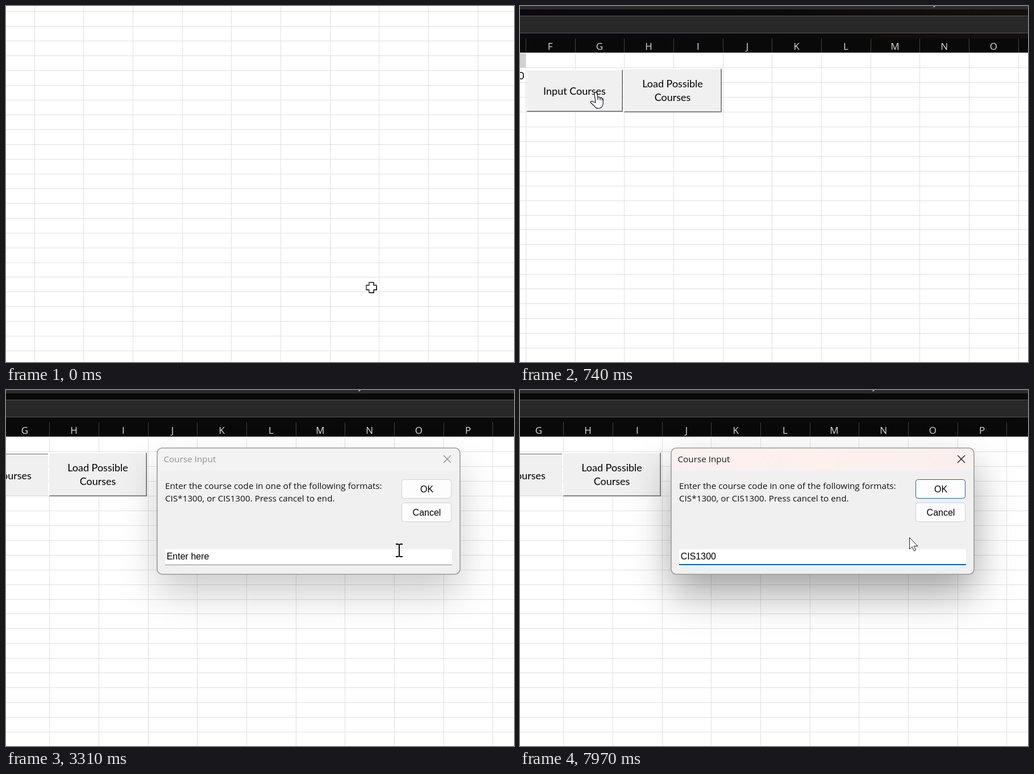
Recreate the animation shown at these times as an HTML page with a canvas. Size 894 by 626 pixels, loop 7990 ms.

```html
<!DOCTYPE html>
<html>
<head>
<meta charset="utf-8">
<style>
html, body { margin: 0; width: 100%; height: 100%; overflow: hidden; background: #fff; }
canvas { display: block; }
</style>
</head>
<body>
<canvas id="stage" width="894" height="626"></canvas>
<script>
const ctx = document.getElementById('stage').getContext('2d');
const W = 894, H = 626, LOOP = 7990;
const COL = 86.68, ROW = 25.95, COL0 = 9.9, ROW0 = 108;
const LATO = '18px Lato, sans-serif';
const UI = '15.25px "Open Sans", sans-serif';
const ARIAL = '16px "Liberation Sans", Arial, sans-serif';

const ramp = (t, a, b) => Math.min(1, Math.max(0, (t - a) / (b - a)));
const smooth = p => p * p * (3 - 2 * p);
const mix = (a, b, p) => a + (b - a) * p;

function rect(x, y, w, h, color) {
  ctx.fillStyle = color;
  ctx.fillRect(x, y, w, h);
}

function text(str, x, y, font, color = '#000', align = 'left') {
  ctx.font = font;
  ctx.fillStyle = color;
  ctx.textAlign = align;
  ctx.fillText(str, x, y);
}

function box(x, y, w, h, r, fill, stroke, line = 1) {
  ctx.beginPath();
  ctx.roundRect(x, y, w, h, r);
  ctx.fillStyle = fill;
  ctx.fill();
  if (!stroke) return;
  ctx.strokeStyle = stroke;
  ctx.lineWidth = line;
  ctx.stroke();
}

// View offset of the sheet
function pan(t) {
  const left = Math.pow(1 - ramp(t, 20, 500), 2.34);
  return { x: Math.round(-566.6 * left - 107 * smooth(ramp(t, 1880, 2650))), y: -228.4 * left };
}

function drawGrid(dx, dy) {
  rect(0, 0, W, H, '#fff');
  for (let k = -1; k < 22; k++) rect(Math.round(COL0 + COL * k + dx), 0, 1, H, '#e0e0e0');
  for (let k = 0; k < 34; k++) rect(0, Math.round(ROW0 + ROW * k + dy), W, 1, '#e0e0e0');
}

function drawHeader(dx, dy, modal) {
  ctx.save();
  ctx.translate(0, Math.round(dy));
  const strip = ctx.createLinearGradient(0, 0, W, 0);
  strip.addColorStop(0, modal ? '#0a0a0a' : '#0c0912');
  strip.addColorStop(0.5, '#0a0a0a');
  strip.addColorStop(1, modal ? '#0a0a0a' : '#15100d');
  rect(0, 0, W, 57, strip);
  rect(0, -400, W, 406, '#2b2b2b');
  text('y', 727 + dx, -2, UI, '#eee');
  rect(0, 17, W, 31, '#282828');
  rect(0, 17, W, 1, '#555');
  rect(0, 47, W, 1, '#555');
  rect(0, 57, W, 25, '#090909');
  for (let k = -1; k < 20; k++) {
    const x = COL0 + COL * k + dx;
    rect(Math.round(x), 57, 1, 25, '#444');
    text(String.fromCharCode(70 + k), x + COL / 2, 77, '17px "Open Sans", sans-serif', '#dcdcdc', 'center');
  }
  ctx.restore();
}

function drawButton(x, y, w, h, lines, pressed) {
  rect(x, y, w, h, '#f0f0f0');
  if (pressed) {
    rect(x, y, w, 1, '#696969');
    rect(x, y, 1, h, '#696969');
    rect(x, y + h - 1, w, 1, '#e3e3e3');
  } else {
    rect(x, y, w, 1, '#fff');
    rect(x + 1, y + h - 2, w - 1, 1, '#a0a0a0');
    rect(x + w - 2, y + 1, 1, h - 1, '#a0a0a0');
    rect(x, y + h - 1, w, 1, '#696969');
    rect(x + w - 1, y, 1, h, '#696969');
  }
  const shift = pressed ? 1 : 0;
  lines.forEach((line, i) => text(line, x + w / 2 - 0.5 + shift,
    y + h / 2 + 6.5 + (i - (lines.length - 1) / 2) * 24 + shift, LATO, '#000', 'center'));
}

const KEYS = [5970, 6100, 6230, 6770, 6860, 7100, 7250];
const CARET = [[4100, 4570], [4600, 5080], [5320, 5780], [5970, 6740], [6770, 7730]];

function entry(t) {
  if (t >= 5970) return 'CIS1300'.slice(0, KEYS.filter(k => k <= t).length);
  if (t >= 5080) return 'Enter h'.slice(0, Math.max(0, 7 - Math.floor((t - 5080) / 34)));
  return t >= 4600 ? 'Enter her' : 'Enter here';
}

function drawDialog(t) {
  const opening = smooth(ramp(t, 1140, 1320));
  if (!opening) return;
  const focus = 1 - ramp(t, 2700, 2900) + ramp(t, 3840, 4060);
  const active = focus > 0.5;
  const accent = active ? '#0067c0' : '#d0d0d0';

  ctx.save();
  ctx.globalAlpha = opening;
  const size = mix(0.92, 1, opening);
  ctx.translate(640, 213);
  ctx.scale(size, size);
  ctx.translate(-640, -213);

  ctx.save();
  ctx.shadowColor = `rgba(0,0,0,${mix(0.2, 0.36, focus)})`;
  ctx.shadowBlur = 68;
  ctx.shadowOffsetY = 34;
  box(373, 102, 533, 222, 9, '#f0f0f0');
  ctx.restore();

  const title = ctx.createLinearGradient(373, 0, 906, 0);
  title.addColorStop(0, active ? '#f9f1f0' : '#f3f3f3');
  title.addColorStop(0.5, active ? '#fdf0ed' : '#f3f3f3');
  title.addColorStop(1, active ? '#f8f0ee' : '#f3f3f3');
  box(373, 102, 533, 39, [9, 9, 0, 0], title);
  box(373, 102, 533, 222, 9, 'transparent', '#9c9c9c', 1.6);

  const ink = active ? '#1a1a1a' : '#8f8f8f';
  text('Course Input', 384.5, 127, UI, ink);
  ctx.strokeStyle = ink;
  ctx.lineWidth = 1.4;
  ctx.stroke(new Path2D('M877 115l13 13M890 115l-13 13'));

  text('Enter the course code in one of the following formats:', 387, 174, UI, '#111');
  text('CIS*1300, or CIS1300. Press cancel to end.', 387, 196, UI, '#111');
  box(803.5, 157.5, 87, 33, 4, '#fdfdfd', accent);
  box(803.5, 198.5, 87, 33, 4, '#fdfdfd', '#d0d0d0');
  text('OK', 847.5, 180, ARIAL, '#000', 'center');
  text('Cancel', 847.5, 221, ARIAL, '#000', 'center');

  rect(387, 280, 505, 28, '#fff');
  rect(387, active ? 306 : 307, 505, active ? 2 : 1, active ? '#0067c0' : '#868686');
  const selected = t < 2800, value = entry(t);
  if (selected) rect(389, 282, 77, 20, '#0078d7');
  text(value, 389.7, 298, ARIAL, selected ? '#fff' : '#000');
  if (CARET.some(([a, b]) => t >= a && t < b))
    rect(Math.round(389 + ctx.measureText(value).width), 282, 1, 19, '#000');
  ctx.restore();
}

// time, x, y of the pointer's hot spot
const PATH = [
  [20, 643, 495], [200, 134, 133], [500, 134, 152], [740, 134, 152], [900, 150, 170],
  [1250, 150, 170], [1680, 451, 257], [2650, 801, 250], [2700, 801, 250], [3290, 692, 282],
  [3840, 692, 282], [4080, 697, 283], [7890, 697, 283], [7965, 685, 259]
];
const HAND = new Path2D('M-3 2.5C-3-.8 1-.8 1.5 2L3 9C4.5 7.5 6.5 8 7 10C8.5 8.5 10 9 10.5 11C11.5 10 12.5 11 12.5 13L12 21C11 26 8 28 4 28C0 28-1 27-3 24L-9.5 18C-10.5 16-8 14.5-6 16L-1 18Z');
const KNUCKLES = new Path2D('M3 9v4M7 10v4M10.5 11v3');
const ARROW = new Path2D('M.5.5V21L5 16.5L8.5 24L11.5 22.5L8.3 15.5H15Z');
const CROSS = new Path2D('M-4-9H4V-4H9V4H4V9H-4V4H-9V-4H-4Z');
const BEAM = new Path2D('M-6-11H-2L0-10L2-11H6M0-10V10M-6 11H-2L0 10L2 11H6');

function pointerAt(t) {
  let i = 0;
  while (i < PATH.length - 2 && t >= PATH[i + 1][0]) i++;
  const [a, x0, y0] = PATH[i], [b, x1, y1] = PATH[i + 1];
  const p = smooth(ramp(t, a, b));
  return [Math.round(mix(x0, x1, p)), Math.round(mix(y0, y1, p))];
}

function outlined(shape, width) {
  ctx.fillStyle = '#fff';
  ctx.fill(shape);
  ctx.strokeStyle = '#15151f';
  ctx.lineWidth = width;
  ctx.stroke(shape);
}

function drawPointer(t) {
  if (t >= 5970 && t < 7890) return;
  ctx.save();
  ctx.translate(...pointerAt(t));
  ctx.lineJoin = 'round';
  if (t < 160) {
    ctx.save();
    ctx.translate(1, 1);
    ctx.fillStyle = '#000';
    ctx.fill(CROSS);
    ctx.restore();
    outlined(CROSS, 1.3);
  } else if (t < 1250) {
    outlined(HAND, 1.2);
    ctx.stroke(KNUCKLES);
  } else if (t < 3150 || t >= 7930) {
    outlined(ARROW, 1);
  } else {
    ctx.strokeStyle = '#000';
    ctx.lineWidth = 1.9;
    ctx.stroke(BEAM);
  }
  ctx.restore();
}

function draw(t) {
  const { x: dx, y: dy } = pan(t);
  drawGrid(dx, dy);
  ctx.save();
  ctx.translate(dx, Math.round(dy));
  rect(COL0 - COL, 83, COL, 25, '#cfd2d1');
  text('0', 7.5, 129, LATO, '#000', 'right');
  drawButton(12, 112, 169, 74, ['Input Courses'], t >= 1080);
  drawButton(183, 110, 172, 77, ['Load Possible', 'Courses'], false);
  ctx.restore();
  drawHeader(dx, dy, t >= 1080);
  ctx.save();
  ctx.translate(dx, 0);
  drawDialog(t);
  ctx.restore();
  drawPointer(t);
}

function tick() {
  draw(performance.now() % LOOP);
  requestAnimationFrame(tick);
}
tick();
</script>
</body>
</html>
```
